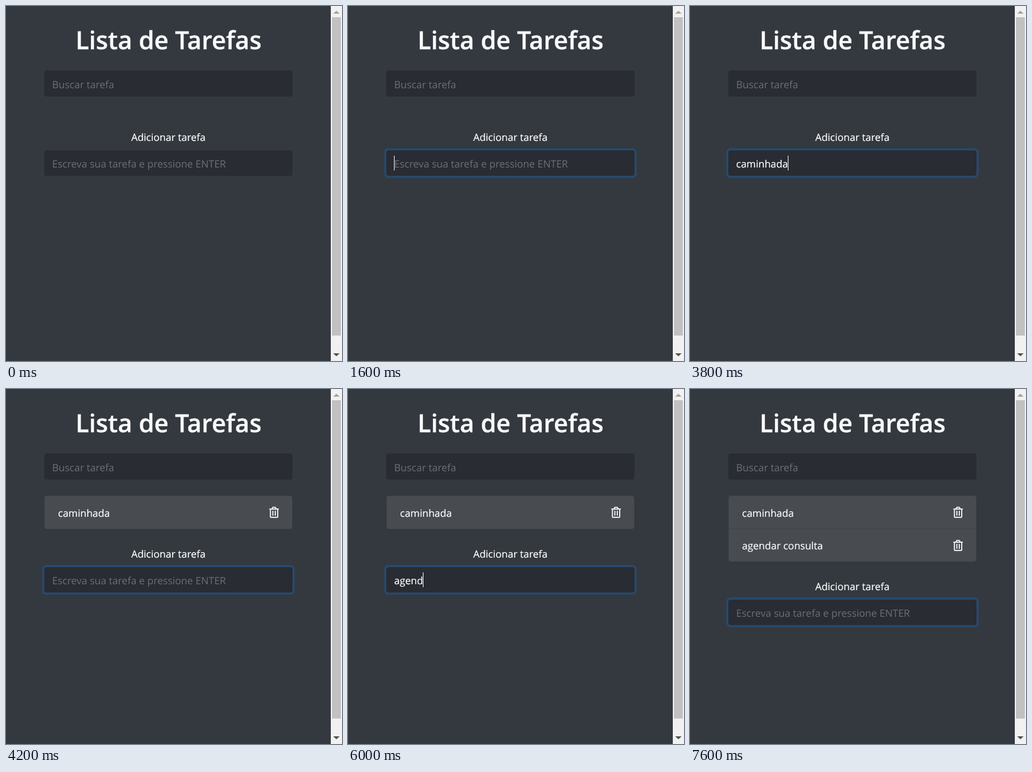
Write an HTML page that moves like this. It is 570 px wide and 600 px high and loops after 8000 ms.

```html
<!DOCTYPE html>
<html lang="pt">
<head>
<meta charset="utf-8">
<title>Lista de Tarefas</title>
<style>
html, body { margin: 0; width: 100%; height: 100%; overflow: hidden; background: #34393f; }
svg { display: block; }
text { font: 17px "Open Sans", "Noto Sans", sans-serif; fill: #fff; stroke: #fff; stroke-width: .2; text-rendering: geometricPrecision; white-space: pre; }
.mid { text-anchor: middle; }
.title { font-size: 42.2px; font-weight: 600; fill: #f8f9fa; stroke-width: .4; }
.hint { fill: #6a7077; stroke: none; }
.field { fill: #292c32; }
.ring { fill: #274a6f; }
.card { fill: #484c51; stroke: #3f4348; }
.icon { fill: none; stroke: #fff; stroke-width: 48; stroke-linecap: round; stroke-linejoin: round; }
</style>
</head>
<body>
<svg width="570" height="600" viewBox="0 0 570 600">
  <defs>
    <g id="trash" class="icon" transform="translate(446.5 199) scale(.0368)">
      <path d="M24 104H424M56 104V464Q56 488 80 488H368Q392 488 392 464V104M126 96L160 36Q166 24 178 24H270Q282 24 288 36L322 96M168 200V392M280 200V392"/>
    </g>
  </defs>

  <text class="title mid" x="275.8" y="73">Lista de Tarefas</text>
  <rect class="field" x="65" y="109" width="421" height="44" rx="4"/>
  <text class="hint" x="78.3" y="139">Buscar tarefa</text>

  <g id="list">
    <rect id="card" class="card" x="65.5" y="180.5" width="420" height="56" rx="4"/>
    <text x="88.3" y="216">caminhada</text>
    <use href="#trash"/>
    <g id="second">
      <path class="card" d="M66 236.5H485"/>
      <text x="88.3" y="271">agendar consulta</text>
      <use href="#trash" y="56"/>
    </g>
  </g>

  <g id="form">
    <text class="mid" x="275.5" y="228">Adicionar tarefa</text>
    <rect id="ring" class="ring" x="61.5" y="240.5" width="428" height="50" rx="7"/>
    <rect class="field" x="65" y="244" width="421" height="43" rx="4"/>
    <text id="hint" class="hint" x="78.3" y="273">Escreva sua tarefa e pressione ENTER</text>
    <text id="typed" x="78.3" y="273"></text>
    <rect id="caret" y="253" width="1" height="25" fill="#fff"/>
  </g>

  <rect x="551" width="19" height="600" fill="#f1f1f1"/>
  <rect x="553" y="19" width="15" height="538" fill="#c1c1c1"/>
  <path d="M555 13L560.5 8L566 13Z" fill="#a3a3a3"/>
  <path d="M555 587L560.5 592L566 587Z" fill="#505050"/>
</svg>
<script>
const LOOP = 8000, FOCUS = 800, TEXT_X = 78.3;
const offsets = [0, 57, 112]; // form shift per number of tasks
// [time, tasks, typed text, caret shown]
const steps = [
  [0, 0, "", 0], [600, 0, "", 1], [1200, 0, "", 0], [1600, 0, "", 1],
  [1800, 0, "cam", 1], [2400, 0, "cam", 0], [2800, 0, "cam", 1], [3200, 0, "cam", 0],
  [3400, 0, "caminh", 1], [3600, 0, "caminhada", 1],
  [4200, 1, "", 0], [4600, 1, "", 1], [4800, 1, "a", 1],
  [5000, 1, "agen", 1], [5400, 1, "agen", 0], [5800, 1, "agen", 1],
  [6000, 1, "agend", 1], [6200, 1, "agenda", 1], [6400, 1, "agendar ", 1],
  [6600, 1, "agendar con", 1], [7000, 1, "agendar consulta", 1],
  [7600, 2, "", 0]
];
const $ = id => document.getElementById(id);
const show = (id, on) => $(id).setAttribute("visibility", on ? "visible" : "hidden");
const start = performance.now();

function draw(now) {
  const t = Math.max(0, now - start) % LOOP;
  const [, tasks, text, caretOn] = steps.findLast(s => s[0] <= t);
  $("list").style.display = tasks ? "" : "none";
  $("second").style.display = tasks > 1 ? "" : "none";
  $("card").setAttribute("height", tasks > 1 ? 111 : 56);
  $("form").setAttribute("transform", `translate(0 ${offsets[tasks]})`);
  show("ring", t >= FOCUS);
  show("hint", !text);
  show("caret", caretOn);
  $("typed").textContent = text;
  const width = text ? $("typed").getComputedTextLength() : 0;
  $("caret").setAttribute("x", Math.floor(TEXT_X + width));
  requestAnimationFrame(draw);
}
draw(start);
</script>
</body>
</html>
```
